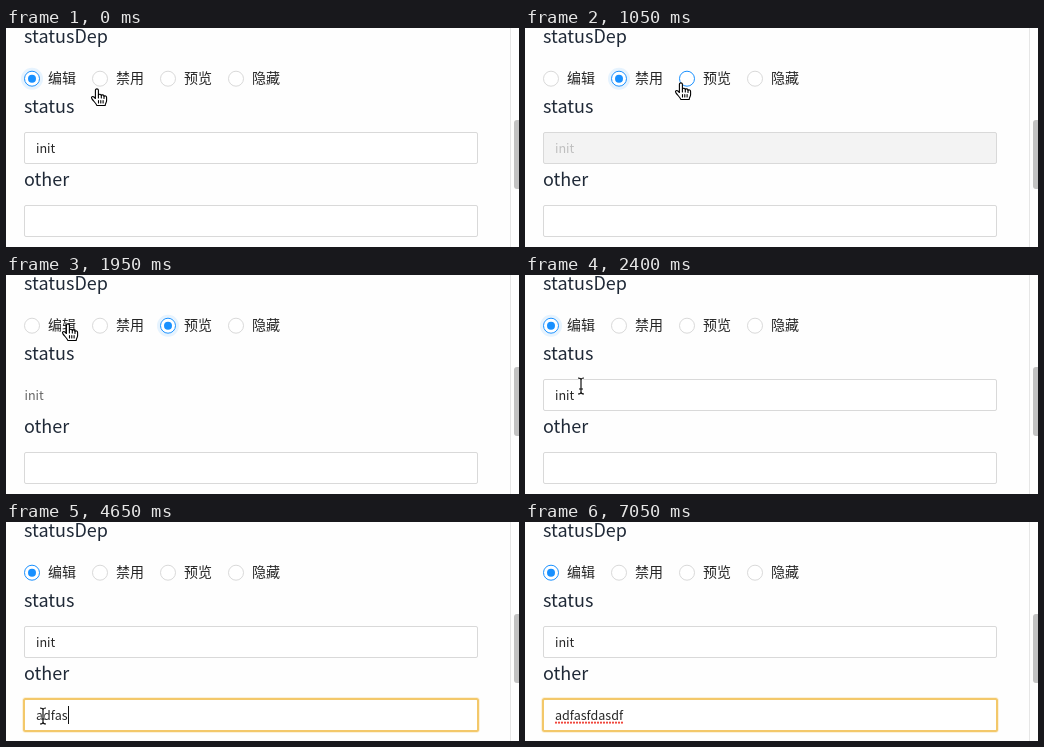
Recreate the animation shown at these times as an HTML page. Size 513 by 219 pixels, loop 7.15 s.

```html
<!DOCTYPE html>
<html lang="zh">
<head>
<meta charset="utf-8">
<style>
html, body { margin: 0; width: 100%; height: 100%; overflow: hidden; background: #fefefe }
svg { display: block; font: 12.55px "Noto Sans CJK SC", "Noto Sans CJK", sans-serif; fill: #262626 }
.title { font-size: 18px; fill: #1f2937 }
.label { font-size: 14px }
</style>
</head>
<body>
<svg width="513" height="219" viewBox="0 0 513 219">
  <path d="M504.5 0V219" stroke="#e6e6e6"/>
  <rect x="508" y="92" width="10" height="69" rx="3" fill="#c2c2c2"/>
  <g class="title">
    <text x="18" y="15">statusDep</text>
    <text x="18" y="85">status</text>
    <text x="18" y="158">other</text>
  </g>
  <g id="radios"></g>
  <rect id="statusBox" x="18.5" y="104.5" width="453" height="31" rx="1.5" stroke="#d9d9d9"/>
  <text id="statusText" y="125">init</text>
  <rect id="glow" x="17" y="176" width="456" height="34" rx="3" fill="none" stroke-width="2" stroke-opacity=".25"/>
  <rect id="otherBox" fill="#fff"/>
  <text id="otherText" x="30" y="198"></text>
  <path id="squiggle" stroke="#f0483e" stroke-width="2.2" stroke-linecap="round" stroke-dasharray="0 3"/>
  <path id="caret" stroke="#111"/>
  <g id="hand" stroke="#000" stroke-width="1.1" stroke-linejoin="round" stroke-linecap="round">
    <path fill="#fff" d="M-1.6 9.5V1.2C-1.6-.6 1.4-.6 1.4 1.2V6C1.8 4.8 4.2 5 4.3 6.4C5 5.4 7 5.8 7 7.2C8 6.4 9.6 7 9.6 8.4V11.5C9.6 13.4 8.4 14 8.2 16.5H-.2C-.6 14.5-3.4 12.4-5.2 9.6C-6.2 8-4.3 7-3.1 8Z"/>
    <path fill="none" d="M1.4 6V9M4.3 6.4V9M7 7.2V9.4M1.5 11.5V14M3.8 11.5V14M6.1 11.5V14"/>
  </g>
  <g id="beam" fill="none">
    <path id="beamShape" d="M-3-8Q0-8 0-6Q0-8 3-8M0-6V6M-3 8Q0 8 0 6Q0 8 3 8M-2 3H2"/>
    <use href="#beamShape" stroke="#fff" stroke-width="2.6"/>
    <use href="#beamShape" stroke="#111" stroke-width="1.2"/>
  </g>
</svg>
<script>
const LOOP = 7150, STEP = 150;
const GREY = [217, 217, 217], BLUE = [24, 144, 255], SKY = [64, 169, 255], AMBER = [243, 200, 106];
const $ = id => document.getElementById(id);
const set = (el, attrs) => { for (const k in attrs) el.setAttribute(k, attrs[k]); };
const show = (id, on) => set($(id), { visibility: on ? 'visible' : 'hidden' });
const mix = (a, b, p) => a.map((v, i) => v + (b[i] - v) * p);
const rgb = c => `rgb(${c.map(Math.round)})`;
// ease-out progress of a change that starts at `from` and lasts `span`
const ease = (t, from, span) => {
  const p = Math.max(0, Math.min(1, (t - from) / span));
  return p * (2 - p);
};

// clicks come at a steady pace, the third one returns to the first choice
const FIRST_CLICK = 450, CLICK_GAP = 900;
const FOCUS = 3150, ERASE = 4050, RETYPE = 4650, TYPED = 5700;
const POINTER = [
  { t: 0, at: [91, 61] }, { t: 600, at: [94, 50] }, { t: 1050, at: [156, 55] }, { t: 1350, at: [161, 50] },
  { t: 1950, at: [62, 49] }, { t: 2250, at: [58, 50] }, { t: 2400, at: [56, 111] }, { t: 2850, at: [37, 194] }
];

function pointerAt(t) {
  const i = POINTER.findIndex(k => k.t > t);
  if (i < 0) return POINTER.at(-1).at;
  const a = POINTER[i - 1], b = POINTER[i];
  return mix(a.at, b.at, (t - a.t) / (b.t - a.t));
}

function typedAt(t) {
  if (t < FOCUS) return '';
  if (t < ERASE) return 'adfasdf'.slice(0, (t - FOCUS) / 64);
  if (t < RETYPE) return 'adfasdf'.slice(0, 7 - Math.floor((t - ERASE) / 300));
  return 'adfasfdasdf'.slice(0, 5 + (t - RETYPE) / 175);
}

// solid while typing, then blinking
function caretAt(t) {
  const idle = t - (t < RETYPE ? ERASE - 300 : TYPED);
  return t >= FOCUS && (idle < 0 || Math.floor((idle + 250) / 500) % 2 === 0);
}

const radios = ['编辑', '禁用', '预览', '隐藏'].map((name, i) => {
  const x = 26 + 68 * i;
  $('radios').insertAdjacentHTML('beforeend', `<g transform="translate(${x} 50.7)">
    <circle r="9.5" fill="none" stroke="#1890ff" stroke-width="3"/>
    <circle r="7.5" fill="#fff"/>
    <circle fill="#1890ff"/>
    <text class="label" x="16" y="4.3">${name}</text></g>`);
  return $('radios').lastChild.children;
});

function draw(t) {
  const clicks = Math.min(3, Math.floor((t - FIRST_CLICK) / CLICK_GAP) + 1);
  const choice = clicks % 3;
  const fresh = clicks ? ease(t, FIRST_CLICK + (clicks - 1) * CLICK_GAP - STEP, 300) : 1;
  const [px, py] = pointerAt(t), overText = t >= 2400;

  radios.forEach(([halo, ring, dot], i) => {
    const on = i === choice;
    const hover = !overText && Math.hypot(px - 26 - 68 * i, py - 51) < 9;
    set(halo, { 'stroke-opacity': on && t < 2700 ? .1 : 0 });
    set(ring, { stroke: rgb(on ? mix(GREY, BLUE, fresh) : hover ? BLUE : GREY) });
    set(dot, { r: on ? 4 * fresh : 0 });
  });

  const disabled = choice === 1, preview = choice === 2;
  show('statusBox', !preview);
  set($('statusBox'), { fill: rgb(mix([255, 255, 255], [243, 243, 243], disabled ? fresh : 0)) });
  set($('statusText'), { x: preview ? 18.5 : 30, fill: disabled ? '#bfbfbf' : preview ? '#666' : '#262626' });

  // hover and focus turn the border blue, the warning then turns it amber
  const stroke = rgb(mix(mix(GREY, SKY, ease(t, 2550, 300)), AMBER, ease(t, 3300, 430)));
  const focus = t >= FOCUS, edge = focus ? 18 : 18.5;
  set($('otherBox'), {
    stroke, 'stroke-width': focus ? 2 : 1, rx: 1.5,
    x: edge, y: edge + 159, width: 490 - 2 * edge, height: 68 - 2 * edge
  });
  set($('glow'), { stroke });
  show('glow', focus);

  $('otherText').textContent = typedAt(t);
  const end = 30 + $('otherText').getComputedTextLength();
  set($('caret'), { d: `M${Math.round(end) + .5} 184V202` });
  set($('squiggle'), { d: `M31 200.7H${end}` });
  show('caret', caretAt(t));
  show('squiggle', t >= 6600);

  show('hand', !overText);
  show('beam', overText && t < 5400);
  for (const id of ['hand', 'beam']) set($(id), { transform: `translate(${px} ${py})` });
}

function frame(now) {
  draw(Math.floor(now % LOOP / STEP) * STEP);
  requestAnimationFrame(frame);
}
draw(0);
requestAnimationFrame(frame);
</script>
</body>
</html>
```
